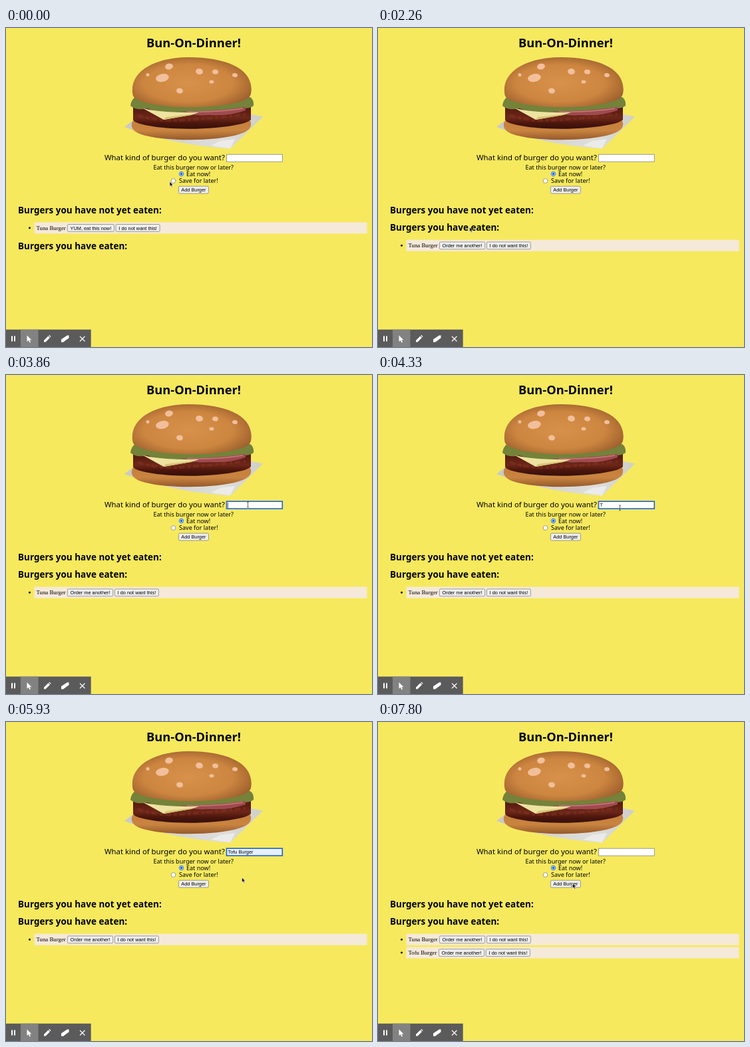
Recreate the animation shown at these times as an HTML page. Size 550 px wide and 480 px high, loop 8000 ms.

```html
<!DOCTYPE html>
<html lang="en">
<head>
<meta charset="utf-8">
<style>
  html, body { margin: 0; width: 100%; height: 100%; overflow: hidden; background: #f6e95e; }
  svg { display: block; }
  text { white-space: pre; }
  .label { font-family: "Noto Sans", sans-serif; }
  .bold { font: bold 13.5px "Noto Sans", sans-serif; }
  .ui { font: 7.35px "Liberation Sans", Arial, sans-serif; }
  .item { font: 8.8px "Liberation Serif", "Times New Roman", serif; }
</style>
</head>
<body>
<svg width="550" height="480" viewBox="0 0 550 480">
  <defs>
    <radialGradient id="bun" cx=".47" cy=".52" r=".62">
      <stop offset="0" stop-color="#d8914a"/><stop offset=".6" stop-color="#cd8640"/><stop offset="1" stop-color="#95592a"/>
    </radialGradient>
    <linearGradient id="base" x2="0" y2="1">
      <stop offset="0" stop-color="#c57f3b"/><stop offset=".55" stop-color="#c98440"/><stop offset="1" stop-color="#96592a"/>
    </linearGradient>
    <linearGradient id="paper">
      <stop offset="0" stop-color="#c9c9c4"/><stop offset=".7" stop-color="#dededc"/><stop offset="1" stop-color="#cfcfc9"/>
    </linearGradient>
    <linearGradient id="meat" x2="0" y2="1">
      <stop offset="0" stop-color="#54190f"/><stop offset=".5" stop-color="#6d2718"/><stop offset=".75" stop-color="#4a150c"/><stop offset="1" stop-color="#35100a"/>
    </linearGradient>
  </defs>

  <text class="bold" x="282" y="28.5" text-anchor="middle" style="font-size:18.3px">Bun-On-Dinner!</text>

  <g id="burger">
    <path d="M178 149L196 135L365 129L386 133.500L337 181.500Q250 176 178 149Z" fill="url(#paper)"/>
    <path d="M322 170L344 167L337 181.500L308 177Z" fill="#ebebe9"/>
    <path d="M189 144Q190 137 200 137H360Q368 137 368 143Q370 154 350 160C315 171 235 171 203 160Q187 154 189 144Z" fill="url(#base)"/>
    <path d="M191 119H368V138Q362 143 350 145C310 154 240 154 205 145Q192 142 191 138Z" fill="url(#meat)"/>
    <path d="M198 131Q225 141 262 139T360 130" fill="none" stroke="#8c3826" stroke-width="4" stroke-dasharray="9 4 5 3" opacity=".4"/>
    <path d="M187 117Q188 108 194 104H367Q373 108 372 117Q367 121 357 121Q320 128 290 125Q265 130 245 127Q226 126 212 121Q196 125 187 117Z" fill="#74823a"/>
    <path d="M262 126Q315 125 360 119V124Q335 133 305 131Q280 133 262 126Z" fill="#a04a50"/>
    <path d="M272 126Q320 127 356 121" fill="none" stroke="#c67b78" stroke-width="1.500"/>
    <path d="M206 121Q235 128 290 127L278 131L237 138Z" fill="#eee3a0"/>
    <path d="M237 138L278 131L284 129L240 134Z" fill="#d6c574"/>
    <path d="M190 97C187 62 229 44 275 44C330 44 372 61 368.500 96Q368 104 361 107C330 123 230 123 198 108Q190 105 190 97Z" fill="url(#bun)"/>
    <g id="seeds" fill="#f1bf9b"></g>
  </g>

  <g class="label">
    <text x="148" y="198.500" font-size="11.35">What kind of burger do you want?</text>
    <g font-size="9.05">
      <text x="221.500" y="212.500">Eat this burger now or later?</text>
      <text x="271" y="223">Eat now!</text>
      <text x="260" y="233.300">Save for later!</text>
    </g>
  </g>
  <rect id="field" x="331.500" y="190.200" width="83.800" height="11"/>
  <text id="value" class="ui" x="333.500" y="198.400"></text>
  <path id="caret" d="M333.500 192V200" stroke="#222" stroke-width=".7"/>
  <circle cx="263.500" cy="219.500" r="3.200" fill="#fff" stroke="#1668e3"/>
  <circle cx="263.500" cy="219.500" r="1.900" fill="#1668e3"/>
  <circle cx="251.500" cy="230" r="3.400" fill="#fff" stroke="#767676" stroke-width=".7"/>
  <g id="add"></g>

  <text class="bold" x="18" y="278.500">Burgers you have not yet eaten:</text>
  <text id="eaten" class="bold" x="18">Burgers you have eaten:</text>
  <g id="waiting"></g><g id="tuna"></g><g id="tofu"></g>

  <g fill="#fff">
    <path d="M0 453.700H127.700V480H0Z" fill="#5b5b5b"/>
    <path d="M22 453.700H48.500V480H22Z" fill="#828282"/>
    <path d="M8 463.500h2v8h-2zM12 463.500h2v8h-2z"/>
    <path d="M31.500 462.500V472L33.800 470L35.500 473.500L37 472.800L35.400 469.400H38.500Z"/>
    <path d="M57 472.500V470L63.500 463.500L66 466L59.500 472.500ZM64.200 462.800L65.300 461.900L67.600 464.200L66.700 465.300Z"/>
    <path d="M83 468.500L92 462.500H94.500V466.500L86 472.800H83Z"/>
    <path d="M111 464L118.500 471.500M118.500 464L111 471.500" stroke="#fff" stroke-width="1.200"/>
  </g>

  <circle id="ring" fill="none" stroke="#de4136" stroke-width="2"/>
  <g id="pointer">
    <path id="arrow" d="M0 0V7.200L1.700 5.700L2.900 8.300L4.100 7.700L3 5.200H5.200Z" fill="#111" stroke="#fff" stroke-width=".6"/>
    <path id="beam" d="M-1.500 -4Q0 -4 0 -3V3Q0 4 -1.500 4M1.500 -4Q0 -4 0 -3M0 3Q0 4 1.500 4" fill="none" stroke="#444" stroke-width=".8"/>
  </g>
</svg>
<script>
const LOOP = 8000;
const FOCUS = 3400, FIRST_KEY = 4130, AUTOFILL = 4400, BLUR = 6400;
const EATEN = 1750, ADDED = 6800;
const CLICKS = [1000, FOCUS, BLUR];
const PATH = [ // time, x, y
  [0, 246, 231], [60, 246, 231], [900, 137.5, 299.5], [2300, 137.5, 299.5],
  [3200, 363.5, 195], [4150, 363.5, 195], [4400, 363.5, 201], [5100, 363.5, 201],
  [5930, 354.5, 234], [6350, 292.5, 243], [LOOP, 292.5, 243]
];
const $ = id => document.getElementById(id);
const set = (id, attrs) => {
  for (const key in attrs) $(id).setAttribute(key, attrs[key]);
};
const show = (id, on) => { $(id).style.display = on ? '' : 'none'; };

const button = (x, y, width, label) => `
  <rect x="${x + .4}" y="${y}" width="${width}" height="10.8" rx="1.5" fill="#efefef" stroke="#777" stroke-width=".7"/>
  <text class="ui" x="${x + width / 2 + .4}" y="${y + 8.1}" text-anchor="middle">${label}</text>`;

const row = (y, name, x, action, width) => `
  <rect x="42.5" y="${y}" width="500" height="17" fill="#f5e9d9"/>
  <circle cx="35.5" cy="${y + 8.5}" r="1.5"/>
  <text class="item" x="45.5" y="${y + 11.3}">${name}</text>
  ${button(x, y + 3.2, width, action)}
  ${button(x + width + 2.7, y + 3.2, 66, 'I do not want this!')}`;

$('add').innerHTML = button(259, 238.2, 45, 'Add Burger');
$('waiting').innerHTML = row(292.3, 'Tuna Burger', 92, 'YUM, eat this now!', 70);
$('tuna').innerHTML = row(318.8, 'Tuna Burger', 92, 'Order me another!', 68.3);
$('tofu').innerHTML = row(338.6, 'Tofu Burger', 91, 'Order me another!', 68.3);
$('seeds').innerHTML = [
  [213, 70.5, 2.5, 2.5], [235, 75, 10, 6], [245, 58, 6, 4.5], [261, 94.5, 5, 4],
  [290.5, 65.5, 5.5, 4.5], [314.5, 66, 4.5, 3.5], [309, 81, 3.5, 2.5], [344, 71, 4, 3]
].map(([x, y, rx, ry]) =>
  `<ellipse cx="${x}" cy="${y}" rx="${rx}" ry="${ry}" transform="rotate(${x < 250 ? -12 : 10} ${x} ${y})"/>`).join('');

function pointerAt(t) {
  const next = PATH.findIndex(point => point[0] > t);
  const [t0, x0, y0] = PATH[next - 1], [t1, x1, y1] = PATH[next];
  const p = (t - t0) / (t1 - t0), ease = p * p * (3 - 2 * p);
  return [x0 + (x1 - x0) * ease, y0 + (y1 - y0) * ease];
}

function draw(t) {
  const eaten = t >= EATEN;
  show('waiting', !eaten);
  show('tuna', eaten);
  show('tofu', t >= ADDED);
  set('eaten', { y: eaten ? 305 : 333 });

  const focused = t >= FOCUS && t < BLUR;
  const filled = t >= AUTOFILL && t < ADDED;
  set('field', {
    fill: filled ? '#e8f0fe' : '#fff',
    stroke: focused ? '#1d63cf' : '#858580',
    'stroke-width': focused ? 1.6 : .8
  });
  $('value').textContent = filled ? 'Tofu Burger' : t >= FIRST_KEY && t < AUTOFILL ? 'T' : '';
  show('caret', focused && t < FIRST_KEY);

  const [x, y] = pointerAt(t);
  const overField = x > 331 && x < 416 && y > 190 && y < 200;
  set('pointer', { transform: `translate(${x} ${y})` });
  show('arrow', !overField);
  show('beam', overField);

  const age = t - CLICKS.findLast(start => start <= t);
  const active = age >= 0 && age < 400;
  show('ring', active);
  if (active) set('ring', {
    cx: x + .5, cy: y + 1.5,
    r: 17.7 * Math.min(1, age / 180),
    opacity: .8 * Math.min(1, (400 - age) / 180)
  });
}

const start = performance.now();
function tick() {
  draw((performance.now() - start) % LOOP);
  requestAnimationFrame(tick);
}
tick();
</script>
</body>
</html>
```
